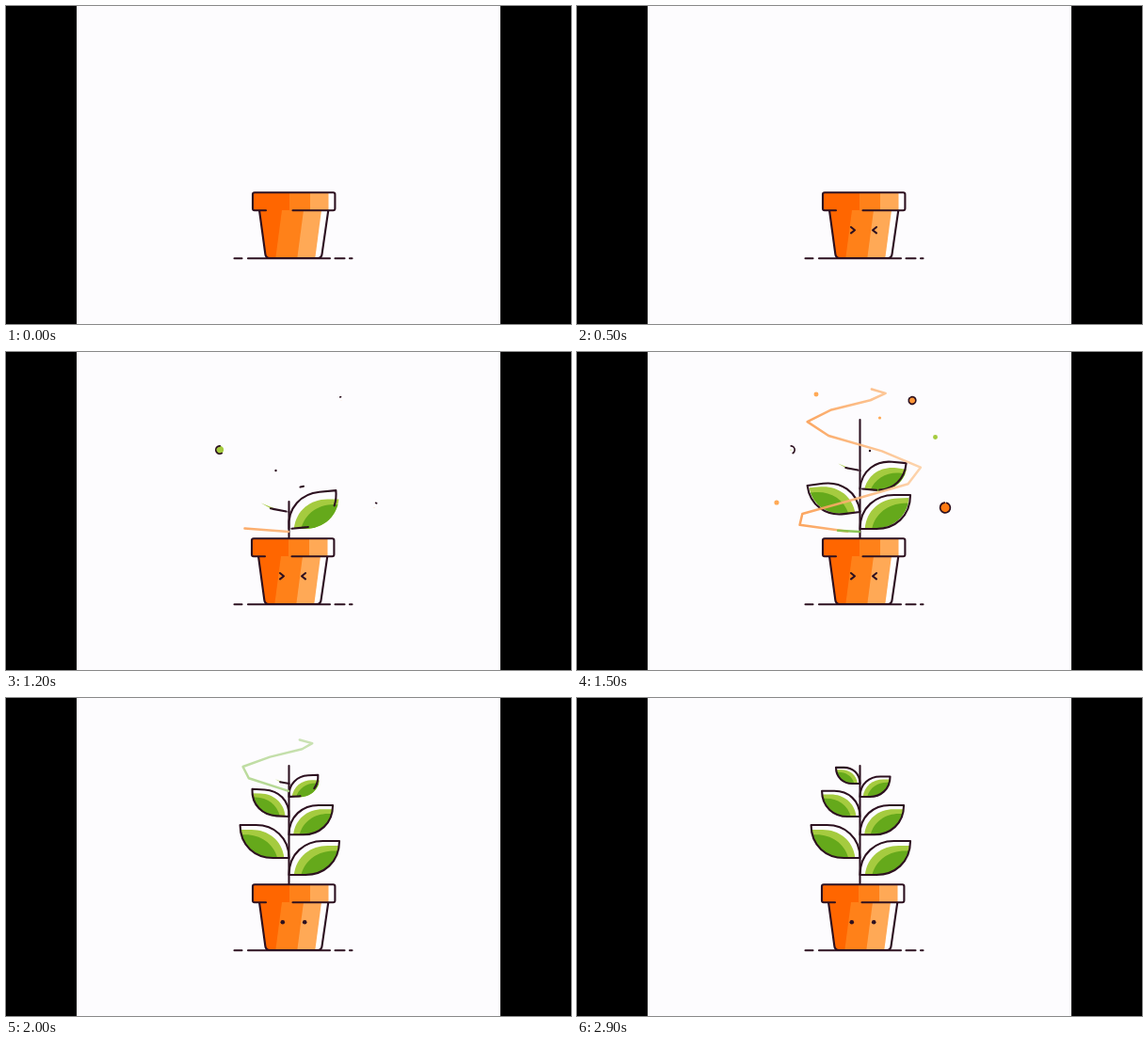
These frames come from a looping animation (600 px wide and 338 px high, 3 s). An HTML page with a canvas:

```html
<!DOCTYPE html>
<html lang="en">
<head>
<meta charset="utf-8">
<title>Growing plant</title>
<style>
  html, body { margin: 0; width: 100%; height: 100%; overflow: hidden; background: #000; }
  canvas { display: block; width: 600px; height: 338px; }
</style>
</head>
<body>
<canvas id="stage" width="600" height="338"></canvas>
<script>
const ctx = document.getElementById('stage').getContext('2d');
const LOOP = 3000, STEP = 100;
const INK = '#2d1120', PAPER = '#fdfcfe';
const ORANGE = ['#ff6600', '#ff8119', '#ffa956', '#ffffff'];
const LIME = '#a5cb3f', GREEN = '#65a91b';
const STEM_X = 300.5, RIM_Y = 198;

const clamp = v => Math.max(0, Math.min(1, v));
const span = (t, from, to) => clamp((t - from) / (to - from));
const mix = (a, b, k) => a + (b - a) * k;
const ease = u => (1 - Math.cos(Math.PI * u)) / 2;

function line(points, color = INK, width = 2.1) {
  ctx.strokeStyle = color;
  ctx.lineWidth = width;
  ctx.beginPath();
  points.forEach(([x, y]) => ctx.lineTo(x, y));
  ctx.stroke();
}

function poly(points, color) {
  ctx.fillStyle = color;
  ctx.beginPath();
  points.forEach(([x, y]) => ctx.lineTo(x, y));
  ctx.fill();
}

function dot(x, y, r, color) {
  ctx.fillStyle = color;
  ctx.beginPath();
  ctx.arc(x, y, r, 0, Math.PI * 2);
  ctx.fill();
}

// --- Pot ---
const BODY = new Path2D('M269 217 L275.4 264 Q276 268 280 268 H331 Q335 268 335.5 264 L342.3 217');
const RIM_LINE = new Path2D('M276 217.3 H264 Q262 217.3 262 215.3 V200.2 Q262 198.2 264 198.2 ' +
  'H347.4 Q349.4 198.2 349.4 200.2 V215.3 Q349.4 217.3 347.4 217.3 H304.5');

// Shudder left, settle, then lean right and left
function potShift(t) {
  const shudder = -3 * span(t, 0, 200) + 2 * span(t, 200, 500);
  return shudder + span(t, 1500, 2000) - 2 * span(t, 2000, 2300);
}

function drawGround() {
  for (const [a, b] of [[242.5, 250.5], [257, 344], [349.5, 359.5], [365, 367.5]]) {
    line([[a, 268.2], [b, 268.2]]);
  }
}

function drawEyes(t) {
  const squint = t >= 400 && t < 1900;
  for (const side of [-1, 1]) {
    const x = 305.5 + side * 11.7;
    if (squint) line([-1, 0, 1].map(k => [x + side * (k ? 1.8 : -2.2), 238.2 + k * 3.2]));
    else dot(x, 238.2, 2.3 * span(t, 0, 300), INK);
  }
}

function drawPot(t) {
  ctx.save();
  ctx.translate(potShift(t), 0);
  for (const [shape, top, low, lean, edges] of [
    [BODY, 217, 268, 6.7, [268, 293, 316, 335]],
    [RIM_LINE, 198, 217.3, 0, [262, 301, 323, 342.5]]
  ]) {
    ctx.save();
    ctx.clip(shape);
    edges.forEach((x, i) =>
      poly([[x, top], [360, top], [360, low], [i ? x - lean : x, low]], ORANGE[i]));
    ctx.restore();
    ctx.strokeStyle = INK;
    ctx.lineWidth = 2.1;
    ctx.stroke(shape);
  }
  drawEyes(t);
  ctx.restore();
}

// --- Plant ---
const LEAF = new Path2D('M0 0 C0 -23 17 -36 36 -36 H53.5 C53.5 -13 36.5 0 17.5 0 Z');
const LEAF_WIDTH = 53.5, LEAF_LEN = 146;
const KNOTS = [188, 170, 145.3, 126, 105, 91];
const STARTS = [1050, 1150, 1260, 1450, 1830, 1950];

// Leaves alternate sides and shrink toward the top
const leaves = KNOTS.map((y, i) => ({
  y, start: STARTS[i], side: i % 2 ? -1 : 1,
  scale: 1 - ((KNOTS[0] - y) / 142) ** 1.7
}));

// Damped swing, in radians
function tilt(age) {
  const damping = Math.max(0, 1 - (age / 650) ** 2);
  return 0.19 * damping * -Math.cos(Math.PI * (0.5 + (age - 195) / 255));
}

function fillLeaf(age) {
  ctx.save();
  if (age < 90) {
    ctx.rotate(tilt(age));
    poly([[17, -1], [32, -4], [17, 1]], LIME);
  } else {
    ctx.rotate(tilt(age + 40));
    ctx.clip(LEAF);
    for (const [dx, dy, color] of [[5, 5, LIME], [6.5, 5.5, GREEN]]) {
      ctx.translate(dx, dy);
      ctx.fillStyle = color;
      ctx.fill(LEAF);
    }
  }
  ctx.restore();
}

function drawLeaf(t, { y, start, side, scale }) {
  const age = t - start;
  if (age < 0) return;
  ctx.save();
  ctx.translate(STEM_X, y);
  ctx.scale(side * scale, scale);
  fillLeaf(age);

  // The outline grows from the stem along both edges until they meet
  const top = 0.88 * Math.sqrt(span(age, 50, 250)), low = 0.12 * clamp(age / 50);
  if (top + low < 1) {
    ctx.setLineDash([top, 1 - top - low, low, 1].map(v => v * LEAF_LEN));
  }
  ctx.rotate(tilt(age));
  ctx.strokeStyle = INK;
  ctx.lineWidth = 2.1 / scale;
  ctx.stroke(LEAF);
  ctx.restore();
}

function drawStem(t) {
  const grown = ease(span(t, 1020, 1500));
  if (grown) line([[STEM_X, RIM_Y], [STEM_X, mix(RIM_Y, 72, grown)]]);
}

// --- Ribbons: a helix that narrows upward, measured in quarter turns ---
const TURNS = 8, TIP = 7.4;

function helix(q) {
  const s = q / TURNS;
  const radius = 70 * (1 - s ** 3.3);
  return [300 - radius * Math.sin(q * Math.PI / 2), 191 - 153 * ease(s ** 0.82)];
}

function ribbon(tail, head, color, squeeze) {
  if (head <= tail) return;
  const points = [], count = Math.ceil((head - tail) * 12);
  for (let i = 0; i <= count; i++) {
    const [x, y] = helix(mix(tail, head, i / count) * TIP);
    points.push([mix(300, x, squeeze), mix(102, y, y < 102 ? squeeze : 1)]);
  }
  ctx.globalAlpha = 0.9;
  line(points, color, 2.5);
  ctx.globalAlpha = 1;
}

function gradient(x0, y0, x1, y1, from, to) {
  const g = ctx.createLinearGradient(x0, y0, x1, y1);
  g.addColorStop(0, from);
  g.addColorStop(1, to);
  return g;
}

const WARM = gradient(234, 0, 370, 0, '#fb9a4c', '#fdd2a8');
const FRESH = gradient(0, 190, 0, 45, '#7fc043', '#c5dfac');

function drawRibbons(t) {
  ribbon(span(t, 1495, 1815), span(t, 1180, 1500), WARM, 1);
  ribbon(span(t, 1600, 2340), span(t, 1490, 1810), FRESH, 0.92);
}

// --- Sparks ---
const DOTS = [[254, 45, 2.5], [321.5, 70, 1.6], [212, 160, 2.6], [380.5, 90.5, 2.5]];
// x, y, radius, fill, start angle in turns, start time
const RINGS = [
  [227, 104, 4.2, LIME, 0.16, 1000],
  [356, 51.5, 3.8, '#ff9638', -0.3, 1190],
  [391, 165.5, 5.4, '#ff7a12', -0.2, 1190]
];

function drawRing(t, [x, y, r, color, turn, start]) {
  const u = span(t, start, start + 700);
  if (!u) return;
  dot(x, y, r * clamp(u * 4) * clamp((0.75 - u) * 4), color);
  const head = clamp(u * 2.1), tail = clamp((u - 0.5) * 2.8);
  if (tail >= head) return;
  ctx.strokeStyle = INK;
  ctx.lineWidth = 1.7;
  ctx.beginPath();
  ctx.arc(x, y, r, (turn + tail) * Math.PI * 2, (turn + head) * Math.PI * 2);
  ctx.stroke();
}

function drawSparks(t) {
  const pop = Math.min(1, 1.2 * Math.sin(Math.PI * span(t, 1300, 1950)));
  if (pop > 0) DOTS.forEach(([x, y, r], i) => dot(x, y, r * pop, i < 3 ? ORANGE[2] : LIME));
  RINGS.forEach(ring => drawRing(t, ring));

  // A dark speck drifts up past a short dash
  const drift = span(t, 1200, 1500);
  if (t >= 1200 && t < 1600) dot(mix(286.5, 311, drift), mix(126, 105, drift), 1.2, INK);
  if (t >= 1150 && t < 1300) line([[312.5, 143.5], [316, 142.7]]);
}

function draw(t) {
  ctx.fillStyle = '#000';
  ctx.fillRect(0, 0, 600, 338);
  ctx.fillStyle = PAPER;
  ctx.fillRect(75, 0, 450, 338);
  ctx.lineCap = ctx.lineJoin = 'round';
  drawGround();
  drawStem(t);
  leaves.forEach(leaf => drawLeaf(t, leaf));
  drawRibbons(t);
  drawSparks(t);
  drawPot(t);
}

const origin = performance.now();
function tick() {
  const t = (performance.now() - origin) % LOOP;
  draw(Math.floor(t / STEP) * STEP);
  requestAnimationFrame(tick);
}
tick();
</script>
</body>
</html>
```
